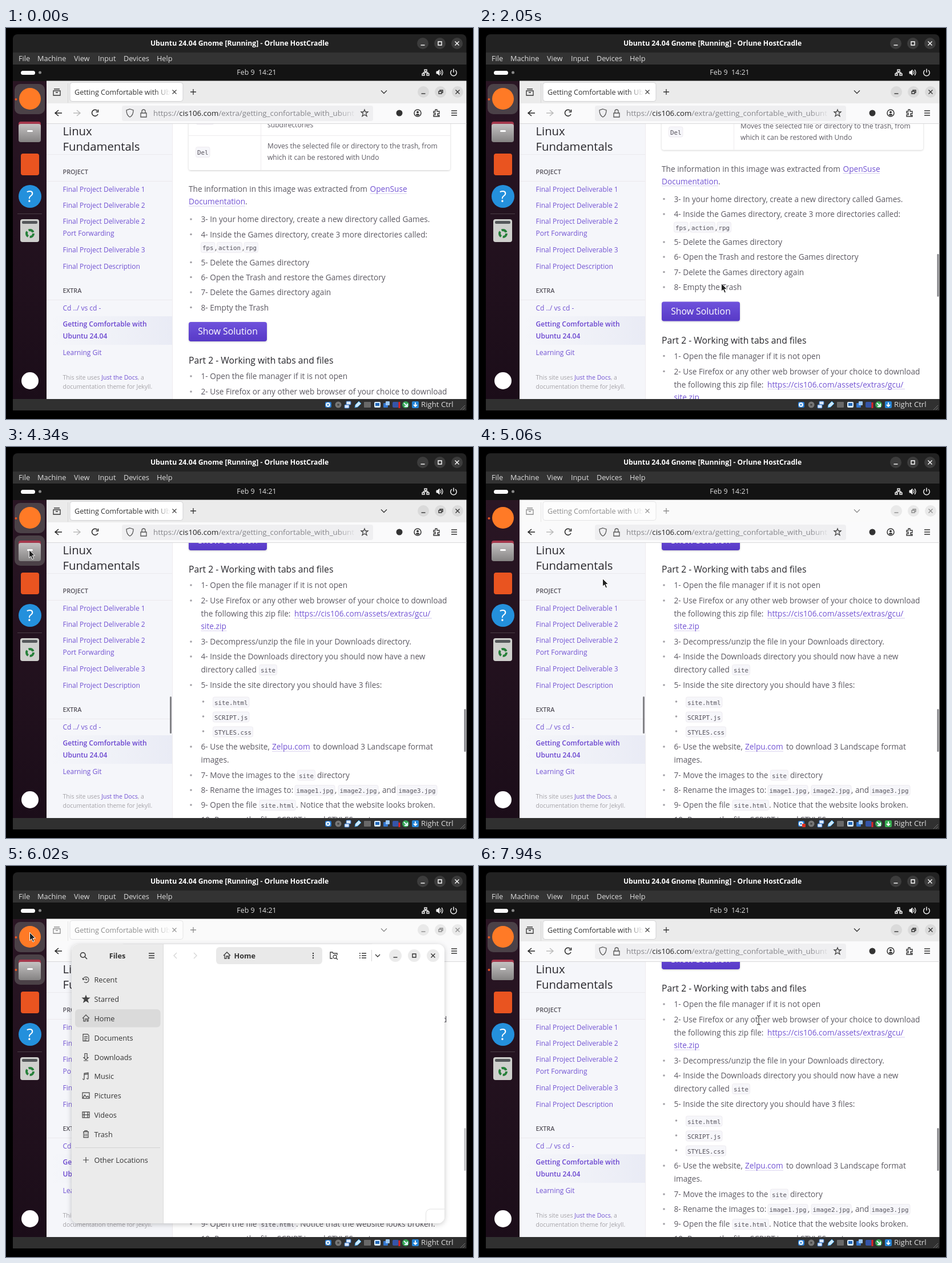
These frames come from a looping animation (818x685 px, 8 s). An HTML page:

```html
<!DOCTYPE html>
<html lang="en">
<head>
<meta charset="utf-8">
<title>Guest desktop</title>
<style>
html, body { margin: 0; width: 100%; height: 100%; overflow: hidden; background: #000; }
svg { display: block; width: 818px; height: 685px; }
text { font: 13.66px "Open Sans", "Noto Sans", sans-serif; fill: #5c5962; }
.ui { font-size: 12.7px; fill: #ddd; }
.bold { font-weight: 700; }
.dark { fill: #333; }
.head { font-size: 15.7px; font-weight: 500; fill: #27262b; }
.cell { font-size: 12.05px; }
.nav { font-size: 12px; fill: #7253d3; }
.on { font-weight: 600; fill: #6a45d0; }
.cap { font-size: 10.8px; font-weight: 600; fill: #55525b; }
.foot { font-size: 10.5px; fill: #a5a3a8; }
.link { fill: #7253d3; }
.code { font: 10.8px "DejaVu Sans Mono", monospace; fill: #55525b; }
</style>
</head>
<body>
<svg id="stage" viewBox="0 0 818 685" xmlns="http://www.w3.org/2000/svg"></svg>
<script>
const rect = (x, y, w, h, fill, r = 0, more = '') =>
  `<rect x="${x}" y="${y}" width="${w}" height="${h}" rx="${r}" fill="${fill}" ${more}/>`;
const dot = (x, y, r, fill, more = '') => `<circle cx="${x}" cy="${y}" r="${r}" fill="${fill}" ${more}/>`;
const text = (x, y, s, cls = '', more = '') => `<text x="${x}" y="${y}" class="${cls}" ${more}>${s}</text>`;
const icon = (x, y, d, color = '#3a3a3a', w = 1.3, fill = 'none') =>
  `<path transform="translate(${x} ${y})" d="${d}" fill="${fill}" stroke="${color}" stroke-width="${w}"/>`;
const group = (id, body, more = '') => `<g id="${id}" ${more}>${body}</g>`;
const chip = (x, y, s) => rect(x, y - 9.5, s.length * 6.5 + 5, 18, '#f6f6fa', 3, 'stroke="#eeebf0"') +
  text(x + 2.5, y + 4, s, 'code');
const item = (y, s) => dot(324, y - 5, 1.8, '#a3a1a6') + text(341.5, y, s);
const link = (x, y, w, s) => rect(x, y + 2.5, w, 1, '#d5cdee') + text(x, y, s, 'link');

const glyph = {
  min: 'M-3.5 3H3.5', max: 'M-3-3H3V3H-3Z', close: 'M-3.5-3.5L3.5 3.5M3.5-3.5L-3.5 3.5',
  restore: 'M-3-1H2V3H-3ZM-1-1V-3H4V1H2', plus: 'M-5 0H5M0-5V5', down: 'M-5-2.5L0 2.5 5-2.5',
  menu: 'M-5-4H5M-5 0H5M-5 4H5', home: 'M-6 0L0-6 6 0M-4-1V5H-1V1H2V5H4V-1',
  recent: 'M-5 0A5 5 0 1 1-3 4M0-3V0H2.5M-6-3L-5 0-2-1',
  star: 'M0-6L1.6-2H6L2.5 1 4 5.5 0 3-4 5.5-2.5 1-6-2H-1.6Z',
  page: 'M-5-6H3L5-4V6H-5ZM-3-2H3M-3 1H3M-3 4H1', save: 'M-2-6H2V1H4L0 5-4 1H-2ZM-4 6.5H4',
  music: 'M-3 4V-5L4-6V3M-3-3L4-4M-5 4a1.2 1.2 0 1 0 2 0M2 3a1.2 1.2 0 1 0 2 0',
  picture: 'M-6-5H6V5H-6ZM-5 4L-2-1 1 3 3 1 6 4', film: 'M-6-5H6V5H-6ZM-3-5V5M3-5V5M-6 0H6',
  trash: 'M-5-4H5M-4-4V6H4V-4M-2-4V-6H2V-4M-1.5-1V4M1.5-1V4',
};
const buttons = (xs, y, r, names, fill, color) =>
  xs.map((x, i) => dot(x, y, r, fill) + icon(x, y, glyph[names[i]], color, 1.4)).join('');

function machineFrame() {
  const menu = [[22, 'File'], [55, 'Machine'], [119, 'View'], [161, 'Input'], [206, 'Devices'], [264, 'Help']];
  const box = (x, fill) => rect(x - 5, 655, 11, 10, fill, 2);
  return rect(12, 11, 794.5, 659, '#222', 8) + rect(12, 43, 794.5, 21, '#333') +
    text(409, 31, 'Ubuntu 24.04 Gnome [Running] - Orlune HostCradle', 'ui bold',
      'text-anchor="middle" style="font-size:12.2px;fill:#fff"') +
    buttons([730, 760, 790], 27, 10, ['min', 'max', 'close'], '#3c3c3c', '#fff') +
    menu.map(([x, s]) => text(x, 58, s, 'ui')).join('') +
    rect(12, 64, 794.5, 29, '#131313') + rect(26, 75, 25, 7, '#fff', 3.5) + dot(59.5, 78, 2.5, '#888') +
    text(439, 82, 'Feb 9&#160; 14:21', 'ui', 'text-anchor="middle" style="font-size:12.4px"') +
    icon(735, 78, 'M-2-5H2V-2H-2ZM-6 2H-2V5H-6ZM2 2H6V5H2ZM0-2V0M-4 2V0H4V2', '#eee', 1.4) +
    icon(758, 78, 'M-4-2H-2L1-5V5L-2 2H-4Z', '#eee', 1, '#eee') +
    icon(758, 78, 'M3-3Q5 0 3 3M5-5Q9 0 5 5', '#eee') +
    icon(784, 78, 'M-3-4A5.3 5.3 0 1 0 3-4M0-6.5V0', '#eee', 1.5) +
    rect(12, 650, 794.5, 20, '#303030') +
    box(564, '#2478d0') + dot(564, 660, 4, '#e4f2ff') + dot(564, 660, 1.5, '#2478d0') +
    rect(566, 660, 6, 6, '#e03020', 1, 'id="disk"') +
    dot(582, 660, 5.5, '#777') + dot(582, 660, 1.8, '#444') +
    rect(596, 654, 8, 6, '#ddeaff', 1, 'stroke="#2c6fc0"') + rect(593, 660, 8, 6, '#ddeaff', 1, 'stroke="#2c6fc0"') +
    icon(616, 660, 'M-5 5L-4 0 2-6 6-2 0 4Z', '#3ca0e8', 1, '#cce8ff') +
    rect(627, 655, 12, 10, '#696969', 1) + box(650, '#d8ecff') + rect(647, 657, 7, 5, '#2368b8') +
    rect(661, 657, 8, 8, '#3478d0', 1) + rect(665, 654, 7, 7, '#9cc8f8', 1) +
    box(682, '#3555a8') + rect(687.5, 655, 3, 11, '#333') + rect(687.5, 655, 3, 11, '#e02525', 0, 'id="load"') +
    dot(700, 660, 6, '#35a855') + icon(700, 660, 'M-3-3L3 3M3-2V3H-2', '#e4f4ff', 2) +
    rect(711, 654, 12, 12, '#2585d8', 2, 'id="grab"') + icon(717, 660, 'M0-4V3M-3 0L0 3 3 0', '#fff', 1.8) +
    text(727, 664, 'Right Ctrl', 'ui', 'style="font-size:13.2px"') +
    icon(800, 665, 'M-4 4L4-4M0 4L4 0', '#777', 1);
}

function dock() {
  return rect(12, 93, 59, 557, 'url(#dockFill)') +
    rect(15, 98, 53, 53, '#4b4147', 10, 'id="webHover"') + rect(15, 155, 53, 53, '#4b4147', 10, 'id="filesHover"') +
    dot(17.5, 125, 2, '#e95420') + dot(17.5, 182, 2, '#e95420', 'id="filesDot"') +
    dot(42, 124, 19, '#ff7a26') +
    rect(22, 164, 39, 28, '#a5384c', 4) + rect(22, 168, 39, 32, 'url(#folderFill)', 4) + rect(37, 179, 10, 3, '#fff', 1.5) +
    rect(26, 220, 32, 38, '#e95420', 4) +
    dot(42, 295, 20, '#2490dc') + text(42, 305, '?', '', 'text-anchor="middle" style="font-size:28px;fill:#fff"') +
    rect(20, 325, 43, 1, '#4a3d45') + rect(25, 335, 33, 40, '#cfd0cd', 4) + rect(28, 338, 27, 5, '#55585a', 2) +
    dot(42, 360, 6, 'none', 'stroke="#26803a" stroke-width="4" stroke-dasharray="9.5 3"') +
    dot(42, 618, 15, '#fff');
}

function browserChrome() {
  const fade = (x, y, w, h, id) => rect(x, y, w, h, `url(#${id})`);
  const bar = icon(89, 112, 'M-6-2H6V6H-6ZM-5-5H5M-2 1H2', '#333') + rect(108, 97, 1, 34, '#d6d6d6') +
    rect(112, 95.5, 198, 33, '#fff', 4, 'stroke="#d2d2d4"') +
    text(120, 117, 'Getting Comfortable with Ub', 'ui dark', 'style="font-size:12.55px"') +
    fade(260, 100, 28, 24, 'tabFade') + icon(295, 112, glyph.close, '#444', 1.2) + icon(328, 112, glyph.plus, '#333') +
    icon(662, 112, glyph.down, '#333') + buttons([731, 761, 791], 112, 10, ['min', 'restore', 'close'], '#dadada', '#333');
  return rect(71, 92.5, 735.5, 39.5, '#ebebeb', 0, 'id="tabStrip"') + group('tabBar', bar) +
    rect(71, 132, 735.5, 36, '#fafafb') + rect(71, 167, 735.5, 1, '#d8d8da') + rect(203, 136, 440, 27, '#efeff1', 4) +
    icon(92, 149, 'M6 0H-6M0-5L-6 0 0 5', '#222', 1.5) + icon(124, 149, 'M-6 0H6M0-5L6 0 0 5', '#bbb', 1.5) +
    icon(156, 149, 'M5 2A5.5 5.5 0 1 1 4-4M5.5-6V-2H1.5', '#222', 1.5) +
    icon(217, 149, 'M0-7L6-5Q6 4 0 7-6 4-6-5Z', '#555') + icon(241, 150, 'M-5-1H5V6H-5ZM-3-1V-4A3 3 0 0 1 3-4V-1', '#555') +
    text(258, 154, 'https://<tspan fill="#222">cis106.com</tspan>/extra/getting_confortable_with_ubunt', 'ui',
      'style="font-size:13.3px;fill:#85858a"') + fade(580, 138, 34, 24, 'urlFade') + rect(614, 137, 4, 25, '#efeff1') +
    icon(628, 149, glyph.star, '#444') + dot(689, 149, 5.5, '#333') +
    dot(721, 149, 6, 'none', 'stroke="#333" stroke-width="1.5"') + dot(721, 147.5, 2, '#333') + rect(718, 150.5, 6, 3, '#333', 1.5) +
    icon(754, 149, 'M-5-3H-2V-6H1V-3H5V1H2V4H5V6H-5V3H-2V0H-5Z', '#333') + icon(785, 149, glyph.menu, '#333', 1.4);
}

function sidebar() {
  const links = [[286.5, 'Final Project Deliverable 1'], [314.5, 'Final Project Deliverable 2'],
    [343, 'Final Project Deliverable 2'], [364, 'Port Forwarding'], [393, 'Final Project Deliverable 3'],
    [421.5, 'Final Project Description'], [494.5, 'Cd ../ vs cd -'], [572.5, 'Learning Git']];
  const title = 'style="font-size:20.3px;fill:#27262b"';
  return rect(71, 168, 220, 482, '#f5f6fa') + rect(291, 168, 1, 482, '#eeebee') +
    [221, 268, 476].map(y => rect(71, y, 220, 1, '#ebe9ed')).join('') +
    text(99.5, 188, 'Linux', '', title) + text(99.5, 215, 'Fundamentals', '', title) +
    text(99.5, 256, 'PROJECT', 'cap') + text(99.5, 464, 'EXTRA', 'cap') + rect(78, 505, 213, 50, 'url(#activeFill)') +
    links.map(([y, s]) => text(99.5, y, s, 'nav')).join('') +
    text(99.5, 523, 'Getting Comfortable with', 'nav on') + text(99.5, 544, 'Ubuntu 24.04', 'nav on') +
    text(99.5, 616, 'This site uses <tspan fill="#7253d3">Just the Docs</tspan>, a', 'foot') +
    text(99.5, 632, 'documentation theme for Jekyll.', 'foot') +
    rect(287, 437, 3, 65, '#828286', 1.5, 'id="navThumb"');
}

function article() {
  const intro = rect(320, 100, 458, 149, '#fff', 4, 'filter="url(#soft)"') + rect(320, 188, 458, 1, '#eeebee') +
    rect(446, 100, 1, 149, '#eeebee') + chip(333, 160.5, 'Ctrl') + text(458, 174, 'subdirectories', 'cell') +
    chip(332.5, 218, 'Del') + text(458, 211, 'Moves the selected file or directory to the trash, from', 'cell') +
    text(458, 231, 'which it can be restored with Undo', 'cell') +
    text(320, 287, 'The information in this image was extracted from') + link(637.5, 287, 64.5, 'OpenSuse') +
    link(320, 309, 99, 'Documentation') + text(419, 309, '.') +
    item(340, '3- In your home directory, create a new directory called Games.') +
    item(366.5, '4- Inside the Games directory, create 3 more directories called:') +
    chip(341.5, 385, 'fps') + text(366, 389, ',') + chip(369.5, 385, 'action') + text(414, 389, ',') + chip(417, 385, 'rpg') +
    item(415.5, '5- Delete the Games directory') + item(441.5, '6- Open the Trash and restore the Games directory') +
    item(468, '7- Delete the Games directory again') + item(494.5, '8- Empty the Trash') +
    rect(320, 515, 137, 34, 'url(#buttonFill)', 4, 'filter="url(#soft)"') +
    text(388.5, 537, 'Show Solution', '', 'text-anchor="middle" style="font-size:15.8px;fill:#fff"');
  const part2 = text(320, 220, 'Part 2 - Working with tabs and files', 'head') +
    item(247, '1- Open the file manager if it is not open') +
    item(274, '2- Use Firefox or any other web browser of your choice to download') +
    text(341.5, 297, 'the following this zip file:') + link(505, 297, 241, 'https://cis106.com/assets/extras/gcu/') +
    link(341.5, 319, 45, 'site.zip') + item(346, '3- Decompress/unzip the file in your Downloads directory.') +
    item(372, '4- Inside the Downloads directory you should now have a new') +
    text(341.5, 395, 'directory called') + chip(443.5, 391, 'site') +
    item(422, '5- Inside the site directory you should have 3 files:') +
    ['site.html', 'SCRIPT.js', 'STYLES.css'].map((s, i) =>
      dot(345.5, 446 + 26 * i, 1.8, '#a3a1a6') + chip(362.5, 447.5 + 26 * i, s)).join('') +
    item(530, '6- Use the website,') + link(466, 530, 67, 'Zelpu.com') + text(538, 530, 'to download 3 Landscape format') +
    text(341.5, 553, 'images.') + item(580, '7- Move the images to the') + chip(510.5, 575.5, 'site') + text(545, 580, 'directory') +
    item(606, '8- Rename the images to:') + chip(506, 602, 'image1.jpg') + text(576, 606, ',') +
    chip(582, 602, 'image2.jpg') + text(652, 606, ', and') + chip(685, 602, 'image3.jpg') +
    item(632, '9- Open the file') + chip(444, 628, 'site.html') + text(508, 632, '. Notice that the website looks broken.') +
    item(658, '10- Rename the files SCRIPT.js and STYLES.css to');
  return intro + group('part2', part2, 'transform="translate(0 368)"');
}

function filesWindow() {
  const places = [['recent', 'Recent'], ['star', 'Starred'], ['home', 'Home'], ['page', 'Documents'], ['save', 'Downloads'],
    ['music', 'Music'], ['picture', 'Pictures'], ['film', 'Videos'], ['trash', 'Trash']];
  const row = (y, name, s) => icon(140, y, glyph[name], '#444', 1.2, name === 'star' ? '#444' : 'none') + text(154.5, y + 5, s, 'ui dark');
  return rect(115, 137, 653, 489, '#fff', 12, 'filter="url(#deep)"') +
    '<path d="M275 137H127a12 12 0 0 0-12 12V614a12 12 0 0 0 12 12H275Z" fill="#ebebeb"/>' + rect(275, 137, 1, 489, '#dcdcdc') +
    icon(136, 157, 'M2.5 2.5L6 6M3-1A4.3 4.3 0 1 1-5.6-1 4.3 4.3 0 0 1 3-1', '#333', 1.5) +
    text(195, 162, 'Files', 'ui dark bold', 'text-anchor="middle"') + icon(255, 157, glyph.menu, '#333', 1.4) +
    icon(296, 157, 'M3-5L-2 0 3 5', '#d4d4d4') + icon(332, 157, 'M-3-5L2 0-3 5', '#d4d4d4') +
    rect(368, 142, 186, 30, '#e9e9e9', 6) + icon(387, 157, glyph.home) + text(399.5, 162, 'Home', 'ui dark bold') +
    [153, 157, 161].map(y => dot(538, y, 1.2, '#333')).join('') +
    icon(574, 157, 'M-2 5H-6V-6H-2L-1-4H6V-1M5 2A3 3 0 1 1-1 2 3 3 0 0 1 5 2M4 4L7 7') +
    icon(625, 157, 'M-6-4H-4M-6 0H-4M-6 4H-4M-2-4H6M-2 0H6M-2 4H6', '#333', 1.7) +
    rect(640, 147, 1, 20, '#d5d5d5') + icon(651, 157, 'M-4-2L0 2 4-2', '#333') +
    buttons([682, 715, 748], 157, 11, ['min', 'max', 'close'], '#ebebeb', '#333') +
    rect(121, 251, 149.5, 31.5, '#dadada', 6) +
    places.map(([name, s], i) => row(199.3 + 33.8 * i, name, s)).join('') +
    rect(121, 493, 149, 1, '#d2d2d2') + row(515, 'plus', 'Other Locations') +
    '<path d="M735.5 626V609a8 8 0 0 1 8-8H768" fill="none" stroke="#e2e2e2"/>';
}

const gradient = (id, from, to, vertical) =>
  `<linearGradient id="${id}" ${vertical ? 'x2="0" y2="1"' : ''}><stop stop-color="${from}"/><stop offset="1" stop-color="${to}"/></linearGradient>`;
const shadow = (id, dy, blur, a) =>
  `<filter id="${id}" x="-10%" y="-30%" width="120%" height="160%"><feDropShadow dx="0" dy="${dy}" stdDeviation="${blur}" flood-opacity="${a}"/></filter>`;

const stage = document.getElementById('stage');
stage.innerHTML = '<defs>' + gradient('dockFill', '#2a1624', '#1b0d19', true) + gradient('folderFill', '#c4c2c2', '#858383', true) +
  gradient('tabFade', '#ffffff00', '#fff') + gradient('urlFade', '#efeff100', '#efeff1') +
  gradient('activeFill', '#ebedf500', '#e9ebf5') + gradient('buttonFill', '#6f53dc', '#5739c6', true) +
  shadow('soft', 1, 1.8, .2) + shadow('deep', 2, 5, .22) +
  '<clipPath id="page"><rect x="292" y="168" width="514.5" height="482"/></clipPath>' +
  '<clipPath id="guest"><rect x="12" y="64" width="794.5" height="586"/></clipPath></defs>' +
  rect(0, 0, 818, 685, '#000') + machineFrame() + dock() + rect(71, 168, 735.5, 482, '#fff') + sidebar() +
  group('pageView', group('article', article()), 'clip-path="url(#page)"') +
  rect(802.5, 389, 3, 75, '#828286', 1.5, 'id="thumb"') + browserChrome() +
  group('files', filesWindow(), 'clip-path="url(#guest)"') +
  group('cursor', group('arrow', icon(0, 0, 'M.5.5V14.5L3.7 11.5 6 17 8.5 16 6.2 10.5H10.5Z', '#fff', 1, '#222')) +
    group('beam', icon(0, 0, 'M-3-8Q0-8 0-6 0-8 3-8M0-6V7M-3 8Q0 8 0 6 0 8 3 8', '#fff', 2.6) +
      icon(0, 0, 'M-3-8Q0-8 0-6 0-8 3-8M0-6V7M-3 8Q0 8 0 6 0 8 3 8', '#333', 1.1)));

const el = id => document.getElementById(id);
const show = (id, on) => el(id).setAttribute('visibility', on ? 'visible' : 'hidden');
const set = (id, name, value) => el(id).setAttribute(name, value);
const within = (t, a, b) => t >= a && t < b;

// Pointer path: time, x, y
const path = [[500, 800, 330], [820, 600, 258], [1300, 347, 346], [1780, 424, 405], [2010, 424, 405], [2020, 424, 447],
  [2580, 424, 447], [2900, 350, 340], [3380, 556, 246], [3620, 557, 238], [4260, 40, 180], [4820, 40, 178],
  [5060, 216, 230], [5620, 41, 104], [5700, 41, 104], [6020, 41, 116], [6180, 41, 116], [6500, 520, 307],
  [6980, 372, 252], [7220, 362, 270], [7380, 362, 270], [7940, 490, 270], [8000, 490, 270]];

function pointerAt(t) {
  const i = Math.max(1, path.findIndex(p => p[0] >= t));
  const [t0, x0, y0] = path[i - 1], [t1, x1, y1] = path[i];
  const k = Math.max(0, (t - t0) / (t1 - t0));
  return [x0 + (x1 - x0) * k, y0 + (y1 - y0) * k];
}

function render(t) {
  const tick = Math.floor((t - 20) / 80) * 80 + 20; // pointer is sampled every 80 ms
  const [x, y] = pointerAt(tick);
  const scroll = t < 2030 ? 0 : t < 2050 ? 12 : t < 2310 ? 35.5 : 368;
  const focused = !within(t, 4500, 6180);
  const filesOpen = within(t, 5700, 6180);
  const beam = within(t, 3380, 3780) || t >= 6980;

  set('article', 'transform', `translate(0 ${-scroll})`);
  set('thumb', 'y', 389 + scroll * 0.19);
  set('thumb', 'opacity', filesOpen ? 0.5 : 1);
  show('thumb', t >= 590);
  show('navThumb', within(t, 3860, 7540));

  set('tabStrip', 'fill', focused ? '#ebebeb' : '#fafafa');
  set('tabBar', 'opacity', focused ? 1 : 0.55);
  show('webHover', focused || t >= 5540);
  show('filesHover', within(t, 4180, 4820) || filesOpen);
  show('filesDot', t >= 5700);
  show('files', filesOpen);

  show('disk', within(t, 4820, 5620));
  set('grab', 'fill', within(t, 4500, 5780) ? '#36b050' : '#2585d8');
  const load = t < 180 ? 11 : 8 + Math.floor(t / 1000) % 4;
  set('load', 'height', load);
  set('load', 'y', 666 - load);

  set('cursor', 'transform', `translate(${x.toFixed(1)} ${y.toFixed(1)})`);
  show('arrow', t >= 510 && !beam);
  show('beam', beam);
}

const start = performance.now();
(function loop() {
  render((performance.now() - start) % 8000);
  requestAnimationFrame(loop);
})();
</script>
</body>
</html>
```
